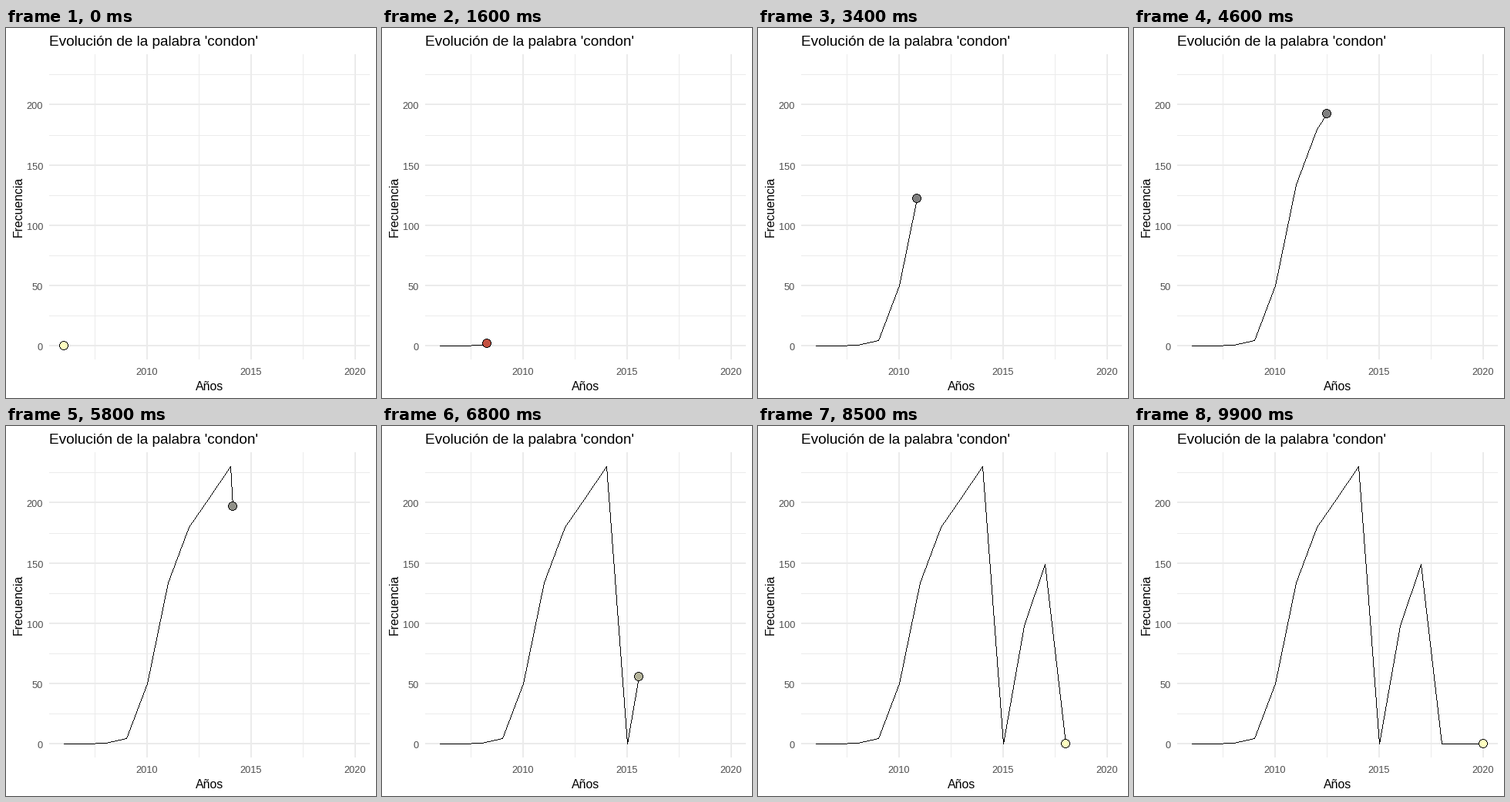
A matplotlib script that plays this animation: 480x480 px, repeating every 10000 ms.

```python
import numpy as np
import matplotlib.pyplot as plt
from matplotlib.animation import FuncAnimation
from matplotlib.colors import to_rgb

SIZE, DPI, FRAMES = 480, 96, 100
PX = 72 / DPI  # one pixel in points
plt.rcParams["font.family"] = "Liberation Sans"

years = np.arange(2006, 2021)
freq = np.array([0, 0, 1, 5, 50, 134, 180, 205, 230, 0, 98, 149, 0, 0, 0])
keys = np.round((FRAMES - 1) * np.arange(len(years)) / (len(years) - 1))

TO_XYZ = np.array([[0.4124, 0.3576, 0.1805],
                   [0.2126, 0.7152, 0.0722],
                   [0.0193, 0.1192, 0.9505]])
WHITE = TO_XYZ.sum(axis=1)


def rgb_to_lab(color):
    c = np.array(to_rgb(color))
    c = np.where(c > 0.04045, ((c + 0.055) / 1.055) ** 2.4, c / 12.92)
    t = TO_XYZ @ c / WHITE
    x, y, z = np.where(t > 0.008856, np.cbrt(t), 7.787 * t + 16 / 116)
    return 116 * y - 16, 500 * (x - y), 200 * (y - z)


def lab_to_rgb(lab):
    y = (lab[0] + 16) / 116
    f = np.array([y + lab[1] / 500, y, y - lab[2] / 200])
    t = np.where(f > 0.2069, f ** 3, (f - 16 / 116) / 7.787)
    c = np.clip(np.linalg.solve(TO_XYZ, t * WHITE), 0, 1)
    c = np.where(c > 0.0031308, 1.055 * c ** (1 / 2.4) - 0.055, 12.92 * c)
    return np.clip(c, 0, 1)


def fill_for(value):
    # values above the scale limit fall back to grey
    return {0: "#FFFFBF", 1: "#D73027"}.get(int(value), "#7F7F7F")


labs = np.array([rgb_to_lab(fill_for(v)) for v in freq])


def to_pixel(v):
    return np.floor(v + 1e-6).astype(int)


def sx(year):
    return to_pixel(75 + 27 * (np.asarray(year) - 2006))


def sy(value):
    return to_pixel(412.88 - 1.565 * np.asarray(value))


# Shapes are drawn on a pixel canvas to keep their edges hard.
rows, cols = np.mgrid[:SIZE, :SIZE] + 0.5


def draw_grid(img, xs, ys, width):
    for x in xs:
        img[34:430, x - width + 1:x + 1] = to_rgb("#EBEBEB")
    for y in ys:
        img[y - width + 1:y + 1, 56:472] = to_rgb("#EBEBEB")


def draw_path(img, xs, ys):
    for x0, y0, x1, y1 in zip(xs, ys, xs[1:], ys[1:]):
        n = max(abs(x1 - x0), abs(y1 - y0)) + 1
        x = np.round(np.linspace(x0, x1, n)).astype(int)
        y = np.round(np.linspace(y0, y1, n)).astype(int)
        img[y, x] = 0


def draw_dot(img, x, y, color):
    dist = np.hypot(cols - x, rows - y)
    img[dist < 5.8] = 0
    img[dist < 5.1] = color


x_ticks, y_ticks = np.arange(2010, 2021, 5), np.arange(0, 201, 50)
base = np.ones((SIZE, SIZE, 3))
draw_grid(base, sx(x_ticks - 2.5), sy(y_ticks + 25), 1)
draw_grid(base, sx(x_ticks), sy(y_ticks), 2)

fig = plt.figure(figsize=(SIZE / DPI, SIZE / DPI), dpi=DPI, facecolor="white")
ax = fig.add_axes([0, 0, 1, 1])
canvas = ax.imshow(base, extent=(0, SIZE, SIZE, 0), interpolation="nearest",
                   aspect="auto")
ax.set(xlim=(0, SIZE), ylim=(SIZE, 0))
ax.axis("off")


def label(x, y, text, size, color="black", **kw):
    ax.text(x, y, text, fontsize=size * PX, color=color, va="baseline", **kw)


for t in x_ticks:
    label(sx(t), 450, str(t), 12.8, "#4D4D4D", ha="center")
for t in y_ticks:
    label(48, sy(t) + 6, str(t), 12.8, "#4D4D4D", ha="right")
label(56, 23, "Evolución de la palabra 'condon'", 19, ha="left")
label(264, 470, "Años", 15.9, ha="center")
label(21, 232, "Frecuencia", 15.9, ha="center", rotation=90,
      rotation_mode="anchor")


def update(i):
    year, value = np.interp(i, keys, years), np.interp(i, keys, freq)
    done = keys <= i
    xs = sx(np.append(years[done], year))
    ys = sy(np.append(freq[done], value))
    img = base.copy()
    draw_path(img, xs, ys)
    color = lab_to_rgb([np.interp(i, keys, channel) for channel in labs.T])
    draw_dot(img, xs[-1], ys[-1], color)
    canvas.set_data(img)
    return canvas,


anim = FuncAnimation(fig, update, frames=FRAMES, interval=100,
                     repeat=True, repeat_delay=0)
plt.show()
```
